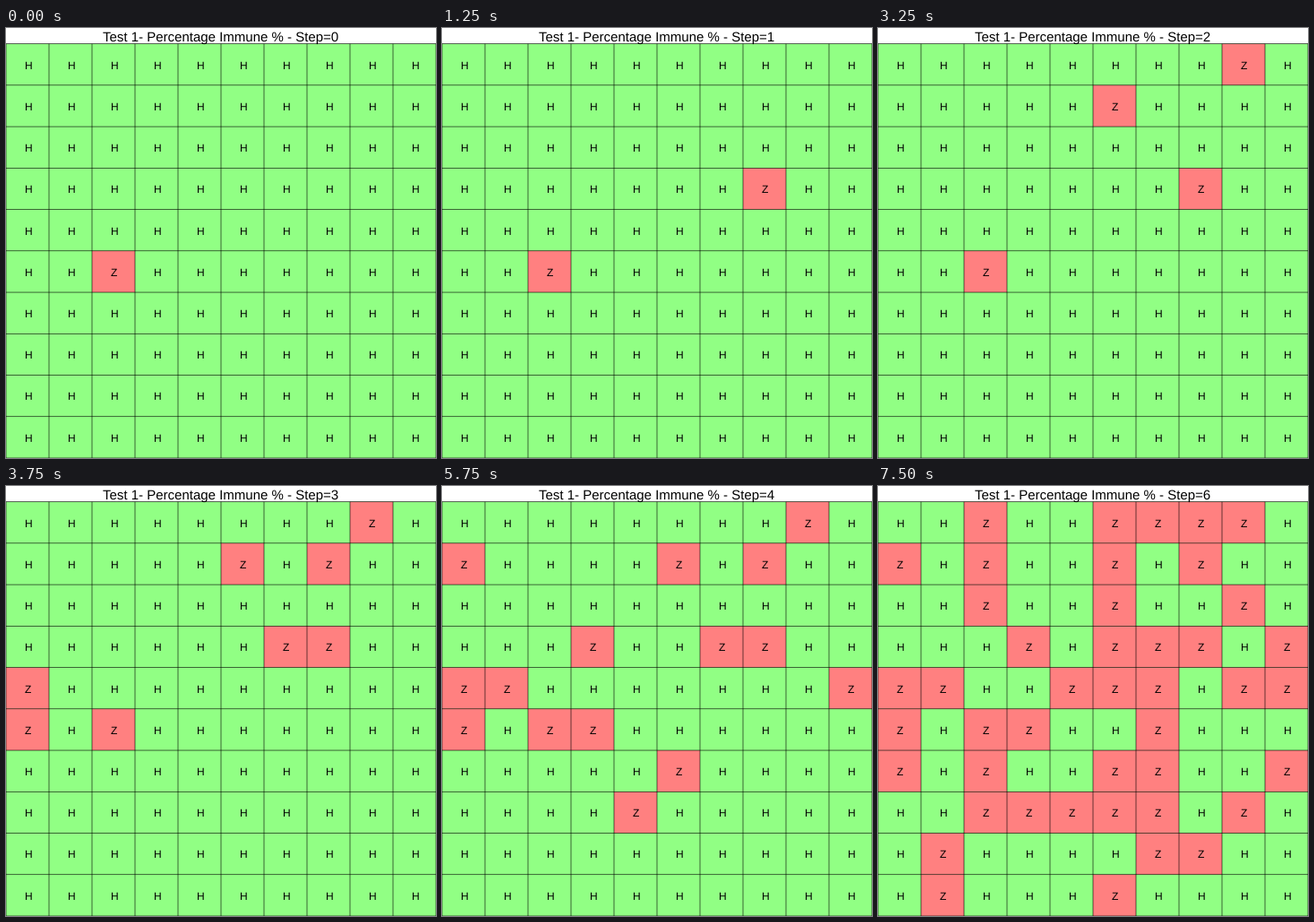
A matplotlib script for the animation above (8 s loop, 480x480 px).

```python
import matplotlib.pyplot as plt
from matplotlib.animation import FuncAnimation
from matplotlib.patches import Rectangle

SIZE, DPI = 480, 80
N = 10
TOP, CELL_W, CELL_H = 17.6, 48, 46.24
LETTER_DROP = 4.83  # from cell centre to letter baseline
INTERVAL, LOOP, STEP_MS = 250, 8000, 1250
HEALTHY, ZOMBIE = "#91ff84", "#ff8080"

# Cells (row, column digits) that turn at each step
INFECTED = [
    "52",
    "37",
    "08 15",
    "17 36 40 50",
    "10 33 41 49 53 65 74",
    "12 25 28 35 46 56 66 69 75 81 91",
    "02 05 06 07 22 39 44 45 48 60 62 72 73 76 78 86 87 95",
]
TURN_STEP = {(int(cell[0]), int(cell[1])): step
             for step, cells in enumerate(INFECTED) for cell in cells.split()}


def px(size):
    """Convert pixels to points."""
    return size * 72 / DPI


plt.rcParams.update({"font.family": "Liberation Sans", "text.hinting": "none"})
fig = plt.figure(figsize=(SIZE / DPI, SIZE / DPI), dpi=DPI, facecolor="white")
ax = fig.add_axes([0, 0, 1, 1])
ax.set_xlim(0, SIZE)
ax.set_ylim(SIZE, 0)
ax.axis("off")


def label(x, baseline, text, size):
    return ax.text(x, baseline, text, fontsize=px(size), color="black",
                   ha="center", va="baseline", zorder=3)


def rect(x, y, w, h, color):
    return ax.add_patch(Rectangle((x, y), w, h, lw=0, snap=False,
                                  facecolor=color))


def grid_line(xs, ys):
    ax.plot(xs, ys, color="black", lw=px(0.6), snap=False,
            solid_capstyle="butt", zorder=2)


rect(0, TOP, SIZE, SIZE - TOP, HEALTHY)
cells = {}
for row in range(N):
    for col in range(N):
        box = rect(col * CELL_W, TOP + row * CELL_H, CELL_W, CELL_H, ZOMBIE)
        baseline = round(TOP + (row + 0.5) * CELL_H + LETTER_DROP)
        cells[row, col] = box, label((col + 0.5) * CELL_W, baseline, "H", 12)

for i in range(N + 1):
    x, y = i * CELL_W, TOP + i * CELL_H
    grid_line([x, x], [TOP, SIZE])
    grid_line([0, SIZE], [y, y])

title = label(SIZE / 2, 15, "", 15)


def draw(frame):
    step = frame * INTERVAL // STEP_MS
    title.set_text(f"Test 1- Percentage Immune % - Step={step}")
    for key, (box, letter) in cells.items():
        turned = TURN_STEP.get(key, len(INFECTED)) <= step
        box.set_visible(turned)
        letter.set_text("Z" if turned else "H")
    return []


anim = FuncAnimation(fig, draw, frames=LOOP // INTERVAL, interval=INTERVAL,
                     repeat=True, repeat_delay=0, blit=False)
plt.show()
```
